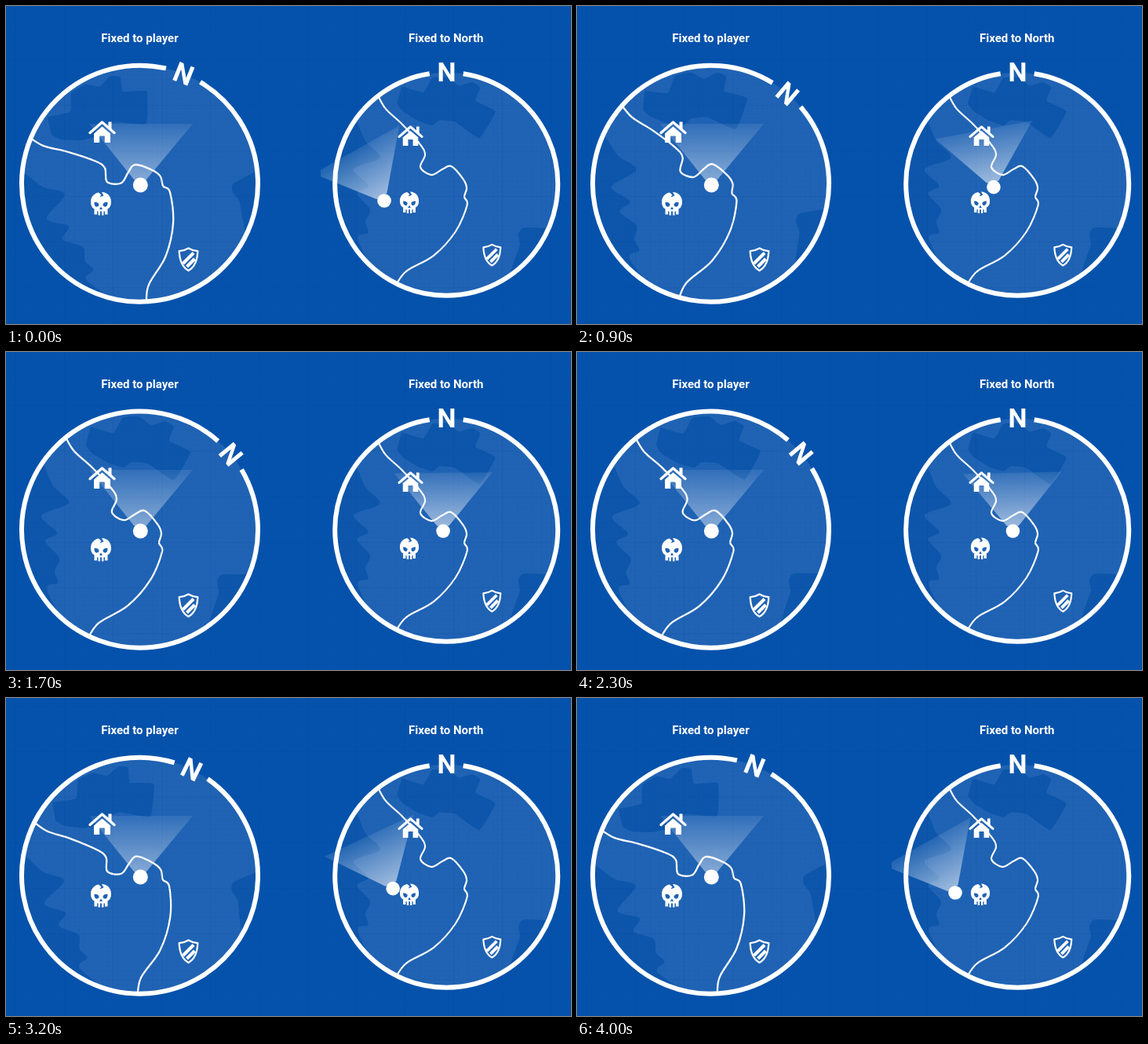
Write an HTML page that moves like this. It is 720 by 405 pixels and loops after 4.1 s.

```html
<!DOCTYPE html>
<html lang="en">
<head>
<meta charset="utf-8">
<title>Minimap orientation</title>
<style>
  html, body { margin: 0; width: 100%; height: 100%; overflow: hidden; background: #0552ac; }
  svg { display: block; width: 720px; height: 405px; }
  text { font-family: Roboto, Arial, sans-serif; font-weight: 700; fill: #fff; text-anchor: middle; }
</style>
</head>
<body>
<svg viewBox="0 0 720 405">
  <defs>
    <pattern id="fine" width="6.2" height="6.2" patternUnits="userSpaceOnUse">
      <path d="M0 .5H6.2M.5 0V6.2" stroke="#003a8c" stroke-width=".6" opacity=".09"/>
    </pattern>
    <pattern id="coarse" x="12" y="10" width="62" height="58" patternUnits="userSpaceOnUse">
      <path d="M0 .5H62M.5 0V58" stroke="#003a8c" opacity=".13"/>
    </pattern>
    <linearGradient id="beam" gradientUnits="userSpaceOnUse" x1="0" y1="-6" x2="0" y2="-78">
      <stop offset="0" stop-color="#fff" stop-opacity=".56"/>
      <stop offset="1" stop-color="#fff" stop-opacity=".1"/>
    </linearGradient>
    <clipPath id="disc"><circle r="150.5"/></clipPath>
    <clipPath id="panel"><rect x="401" width="319" height="405"/></clipPath>

    <g id="map" clip-path="url(#disc)">
      <path id="land" fill="#0d56ab"/>
      <path id="road" fill="none" stroke="#fff" stroke-width="2.3"/>
    </g>
    <path id="cone" fill="url(#beam)" d="M-8-7L-65-78H67L8-7Z"/>

    <g id="house" fill="#fff">
      <path d="M-15.5 1.5L0-12L15.5 1.5" fill="none" stroke="#fff" stroke-width="3.4" stroke-linejoin="round" stroke-linecap="round"/>
      <path d="M8-12.5H12V-1L8-5ZM-10.5 2.5L0-6.5L10.5 2.5V14H3.3V5.5H-3.3V14H-10.5Z"/>
    </g>
    <path id="skull" fill="#fff" fill-rule="evenodd" d="M-3-14C-9-13-13-8-13-2Q-13 5-8.5 7V14H-5V10H-3.5V15H-1V10H1V15H3.5V10H5V14H8.5V7
      Q13 5 13-2C13-9 8-14.4 1-14.4L3.5-10L-1.5-8L.4-11Z
      M-8.5-1.5Q-5-2.500-2.500.7Q-2.500 4.300-5.500 4.300Q-8.800 3.500-8.500-1.500ZM8.500-1.500Q5-2.500 2.500.7Q2.500 4.300 5.500 4.300Q8.800 3.500 8.500-1.500ZM0 4L2 7.500H-2Z"/>
    <g id="shield" fill="none" stroke="#fff">
      <path stroke-width="2.3" stroke-linejoin="round" d="M0-13.5Q-6-10-11.800-9.800Q-11 9 0 15Q11 9 11.800-9.800Q6-10 0-13.500Z"/>
      <path stroke-width="4.200" d="M-7 6L6.500-7.500M-2 10L8 0"/>
    </g>
  </defs>

  <rect width="720" height="405" fill="#0552ac"/>
  <g id="left" transform="translate(170.5 226.2)">
    <circle r="150.5" fill="#2063b4"/>
    <use id="turning" href="#map"/>
  </g>
  <g id="right" transform="translate(561.200 226.700)">
    <circle r="142" fill="#2063b4"/>
    <use href="#map" transform="rotate(1) scale(.943)"/>
  </g>
  <rect width="720" height="405" fill="url(#fine)"/>
  <rect width="720" height="405" fill="url(#coarse)"/>

  <use href="#cone" transform="translate(171 228)" opacity=".8"/>
  <g clip-path="url(#panel)"><use id="sweep" href="#cone"/></g>

  <g fill="none" stroke="#fff" stroke-width="6">
    <path id="ringA"/>
    <path id="ringB" transform="translate(561.200 226.700)"/>
  </g>
  <text id="north" font-size="35">N</text>
  <text x="561.500" y="96" font-size="34">N</text>

  <circle cx="171.300" cy="228" r="9.500" fill="#fff"/>
  <circle id="dot" r="8.800" fill="#fff"/>
  <use href="#house" transform="translate(122.500 160)"/>
  <use href="#house" transform="translate(515.500 165) scale(.93)"/>
  <use href="#skull" transform="translate(121 251.500)"/>
  <use href="#skull" transform="translate(514 250) scale(.93)"/>
  <use href="#shield" transform="translate(232.500 322)"/>
  <use href="#shield" transform="translate(619.300 316.500) scale(.93)"/>

  <text x="170.500" y="46" font-size="15">Fixed to player</text>
  <text x="560.700" y="46" font-size="15">Fixed to North</text>
</svg>
<script>
const el = id => document.getElementById(id);
const set = (id, name, value) => el(id).setAttribute(name, value);
const place = (id, value) => set(id, 'transform', value);

// Key points "x,y x,y ..." taken relative to the left dial's centre
const points = s => s.split(' ').map(p => {
  const [x, y] = p.split(',').map(Number);
  return [x - 170.5, y - 226];
});

// Catmull-Rom curve through the points; bend 0 gives straight lines
function curve(s, bend) {
  const pts = points(s);
  const at = i => pts[Math.max(0, Math.min(pts.length - 1, i))];
  const tip = (i, dir) => [0, 1].map(k =>
    at(i)[k] + dir * (at(i + 1)[k] - at(i - 1)[k]) * bend / 6);
  return 'M' + pts[0] + pts.slice(1).map((p, i) =>
    `C${tip(i, 1)} ${tip(i + 1, -1)} ${p}`).join('');
}

const road = '73,102 86,125 109,146 134,173 141,187 135,204 150,214 165,206 177,202 193,219 198,231 195,243 199,254 184,290 155,323 118,345 103,367';
const coast = '10,110 45,140 60,170 80,192 45,208 65,230 50,241 68,262 62,279 66,294 52,301 68,350 0,350';
const lake = '108,95 102,118 110,129 130,141 150,147 160,140 181,142 214,163 235,127 208,113 214,95 203,88 185,93 170,82 149,83 137,103 108,95';
const bay = '335,284 276,283 269,292 271,307 260,350 335,350';
set('road', 'd', curve(road, 1));
set('land', 'd', curve(coast, .9) + curve(lake, .35) + curve(bay, .4));

function ring(id, r, gap) {
  const a = gap * Math.PI / 180, x = r * Math.sin(a), y = -r * Math.cos(a);
  set(id, 'd', `M${x} ${y}A${r} ${r} 0 1 1 ${-x} ${y}`);
}
ring('ringA', 150.5, 9);
ring('ringB', 142, 8.7);

// cubic-bezier(.4, 0, .2, 1), solved by bisection
function ease(x) {
  let lo = 0, hi = 1;
  for (let i = 0; i < 24; i++) {
    const s = (lo + hi) / 2, q = 1 - s;
    if (1.2 * q * q * s + .6 * q * s * s + s * s * s < x) lo = s; else hi = s;
  }
  return lo * lo * (3 - 2 * lo);
}

const LOOP = 4100, STEP = 100, SWEEP = 2000, OUT = 75, BACK = 2050;
const SWING = 29.3, REST = 51.1;

function draw(t) {
  const away = t < BACK ? 1 - ease((t - OUT) / SWEEP) : ease((t - BACK) / SWEEP);
  const angle = REST - SWING * away;
  const x = 558.7 - 76.7 * away, y = 228 + 20 * away * away;
  const dial = `translate(170.5 226.2) rotate(${angle})`;
  place('turning', `rotate(${angle - 50.5})`);
  place('ringA', dial);
  place('north', dial + ' translate(0 -138.2)');
  place('dot', `translate(${x} ${y})`);
  place('sweep', `translate(${x} ${y}) rotate(${-SWING * away}) scale(.95)`);
}

const start = performance.now();
function tick() {
  const t = (performance.now() - start) % LOOP;
  draw(Math.floor(t / STEP) * STEP);
  requestAnimationFrame(tick);
}
tick();
</script>
</body>
</html>
```
